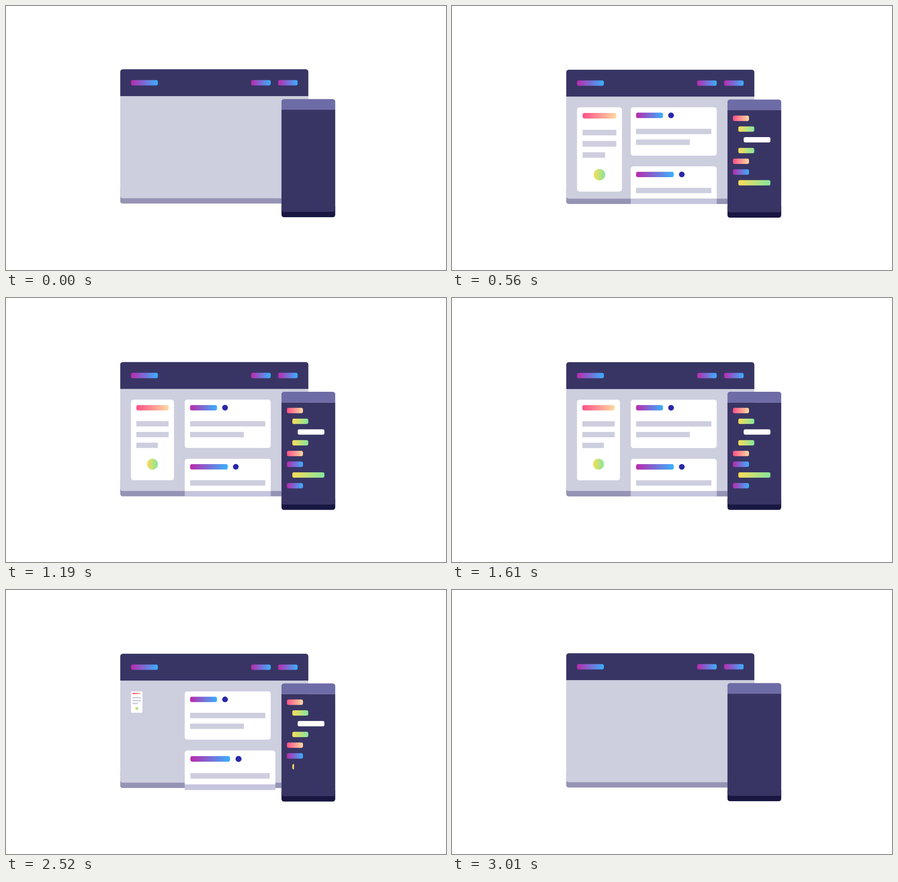
An HTML page with a canvas that plays this animation: 966 px wide and 580 px high, repeating every 3.08 s.

```html
<!DOCTYPE html>
<html lang="en">
<head>
<meta charset="utf-8">
<title>Page builder loop</title>
<style>
  html, body { margin: 0; width: 100%; height: 100%; overflow: hidden; background: #fff; }
  canvas { display: block; width: 966px; height: 580px; }
</style>
</head>
<body>
<canvas id="stage" width="966" height="580"></canvas>
<script>
const ctx = document.getElementById('stage').getContext('2d');

const LOOP = 3080, STEP = 70, SPAN = 3010;
const U = 11.8;                       // layout grid unit
const NAVY = '#383565', GREY = '#cdcede', DOT = '#2a27a8';
const VIOLET = ['#bb29ad', '#38b0fd'];
const PINK = ['#ff4f87', '#ffdaa0'];
const LIME = ['#fbdc58', '#86e69c'];

// Code lines: indent, width, colour
const LINES = [
  [1, 3, PINK], [2, 3, LIME], [3, 5, '#fff'], [2, 3, LIME],
  [1, 3, PINK], [1, 3, VIOLET], [2, 6, LIME], [1, 3, VIOLET]
];
const LINE_GAP = 80, LINE_TIME = 60;
const POP_TIME = 195, POP_START = 198, POP_GAP = 140;

const clamp = v => Math.max(0, Math.min(1, v));
const easeInOut = x => x < .5 ? 2 * x * x : 1 - 2 * (1 - x) * (1 - x);

function backOut(x) {
  const c = 1.70158, d = x - 1;
  return 1 + (c + 1) * d * d * d + c * d * d;
}

// Rises from 0 to height, peaking at the given time, and falls back
function drift(t, height, peak) {
  const power = Math.log(.5) / Math.log(peak / SPAN);
  return height * Math.sin(Math.PI * Math.pow(clamp(t / SPAN), power));
}

// All sizes below are in grid units
function paint(color, x, w) {
  if (typeof color === 'string') return color;
  const g = ctx.createLinearGradient(x * U, 0, (x + w) * U, 0);
  color.forEach((c, i) => g.addColorStop(i, c));
  return g;
}

function box(x, y, w, h, color, radius = 0) {
  ctx.fillStyle = paint(color, x, w);
  ctx.beginPath();
  ctx.roundRect(x * U, y * U, w * U, h * U, radius);
  ctx.fill();
}

const pill = (x, y, w, color) => box(x, y, w, 1, color, 4);

function disc(x, y, r, color) {
  ctx.fillStyle = paint(color, x - r, 2 * r);
  ctx.beginPath();
  ctx.arc(x * U, y * U, r * U, 0, Math.PI * 2);
  ctx.fill();
}

// Draws a card growing out of its top left corner
function pop(order, phase, x, y, draw) {
  const p = clamp((phase - POP_START - order * POP_GAP) / POP_TIME);
  if (p <= 0) return;
  const s = backOut(p);
  ctx.save();
  ctx.translate(x * U, y * U);
  ctx.scale(s, s);
  draw();
  ctx.restore();
}

function firstPost() {
  box(0, 0, 16, 9, '#fff', 5.5);
  pill(1, 1, 5, VIOLET);
  disc(7.5, 1.5, .53, DOT);
  box(1, 4, 14, 1, GREY);
  box(1, 6, 10, 1, GREY);
}

function secondPost() {
  box(0, 0, 16, 6, '#fff', [5.5, 5.5, 0, 0]);
  box(0, 6, 16, 1, '#c5c5de');
  pill(1, 1, 7, VIOLET);
  disc(9.5, 1.5, .53, DOT);
  box(1, 4, 14, 1, GREY);
}

function profile() {
  box(0, 0, 8, 15, '#fff', 5.5);
  pill(1, 1, 6, PINK);
  box(1, 4, 6, 1, GREY);
  box(1, 6, 6, 1, GREY);
  box(1, 8, 4, 1, GREY);
  disc(4, 12, 1.02, LIME);
}

function browser(phase) {
  box(0, 22, 35, 3, '#9694b5', [0, 0, 5.5, 5.5]);
  box(0, 5, 35, 19, GREY, [0, 0, 5.5, 5.5]);
  box(0, 0, 35, 5, NAVY, [5.5, 5.5, 0, 0]);
  pill(2, 2, 5, VIOLET);
  pill(24.36, 2, 3.64, VIOLET);
  pill(29.36, 2, 3.64, VIOLET);
  pop(0, phase, 12, 7, firstPost);
  pop(1, phase, 12, 18, secondPost);
  pop(2, phase, 2, 7, profile);
}

function editor(phase) {
  box(0, 20, 10, 2, '#191742', [0, 0, 5.5, 5.5]);
  box(0, 2, 10, 19, NAVY, [0, 0, 5.5, 5.5]);
  box(0, 0, 10, 2, '#6e6ca6', [5.5, 5.5, 0, 0]);
  LINES.forEach(([x, w, color], i) => {
    const p = easeInOut(clamp((phase - i * LINE_GAP) / LINE_TIME));
    if (p <= 0) return;
    const y = 3 + 2 * i;
    ctx.save();
    ctx.beginPath();
    ctx.rect(x * U, y * U - 1, w * U * p, U + 2);
    ctx.clip();
    pill(x, y, w, color);
    ctx.restore();
  });
}

function place(x, y, draw, phase) {
  ctx.save();
  ctx.translate(x, y);
  draw(phase);
  ctx.restore();
}

function render(now) {
  const t = Math.floor(((now + 6) % LOOP) / STEP) * STEP;
  const phase = Math.max(0, Math.min(t, SPAN - t));   // builds up, then reverses
  ctx.fillStyle = '#fff';
  ctx.fillRect(0, 0, 966, 580);
  place(250.8, 139.1 + drift(t, 1.8, 1590), browser, phase);
  place(604.8, 204.5 + drift(t, 1.5, 1400), editor, phase);
}

function tick(now) {
  render(now);
  requestAnimationFrame(tick);
}

render(0);
requestAnimationFrame(tick);
</script>
</body>
</html>
```
